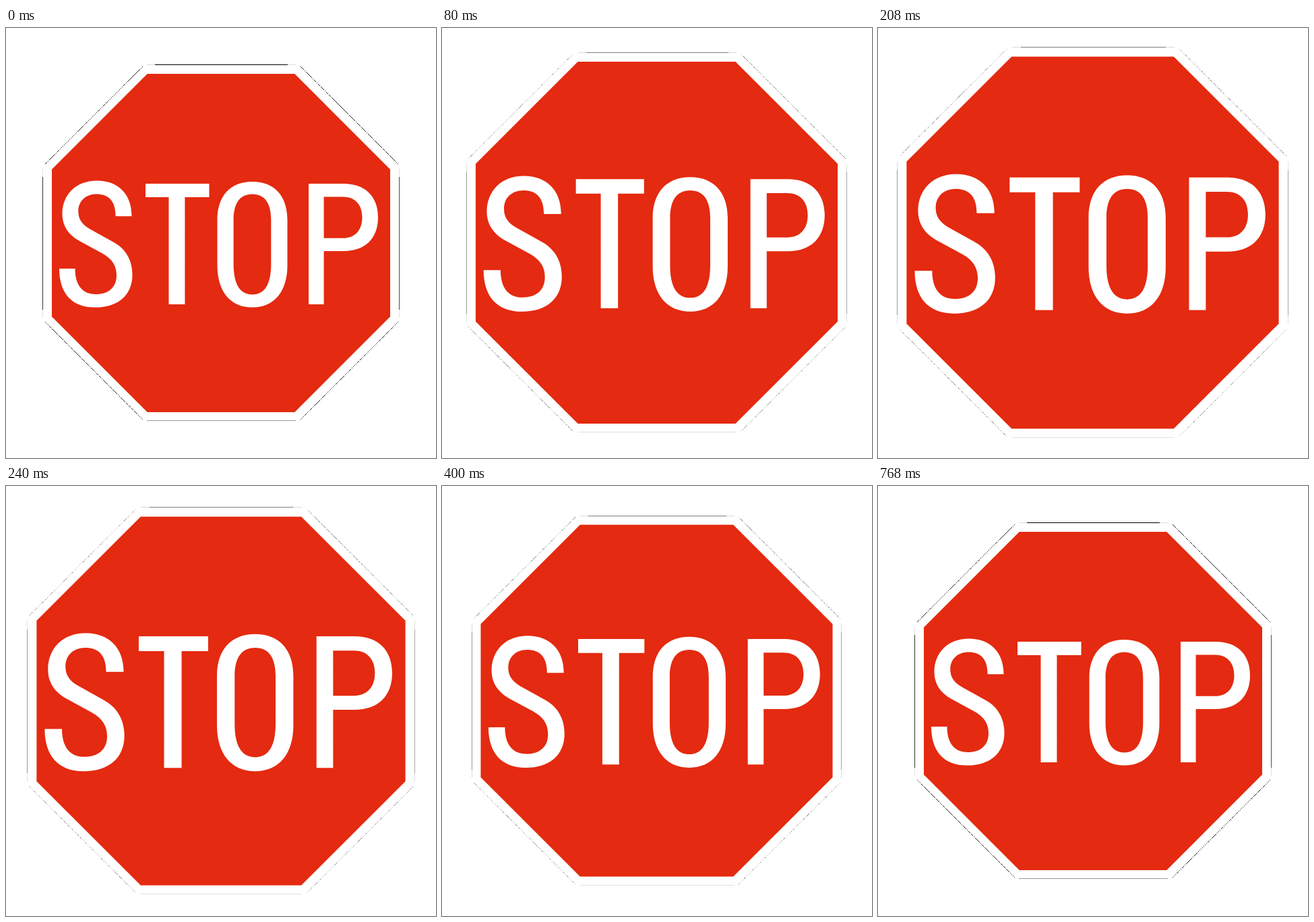
An HTML page with a canvas that plays this animation: 638x638 px, repeating every 960 ms.

```html
<!DOCTYPE html>
<html lang="en">
<head>
<meta charset="utf-8">
<title>Stop sign</title>
<style>
html, body { margin: 0; width: 100%; height: 100%; overflow: hidden; background: #fff; }
canvas { display: block; width: 638px; height: 638px; }
</style>
</head>
<body>
<canvas id="stage" width="638" height="638" role="img" aria-label="STOP"></canvas>
<script>
const ctx = document.getElementById('stage').getContext('2d');
const RED = '#e42a10';
const STEP = 80, LOOP = 960, MID = 319;

// Each pose: scale, centre
const poses = [[1, 319], [1.07, 318.5], [1.1, 318.5], [1.09, 319], [1.08, 318.5], [1.04, 318.5]];

// Sign lettering, drawn at scale 1
const letters = new Path2D(`
  M186.5 279.3C186.5 246 166 226.5 135 226.5C103 226.5 83.5 248 83.5 276
  C83.5 294 93 307 109 316L143 334.5C158 343 164 353 164 367
  C164 385 152 395 133 395C113 395 102.5 381 102.5 357H79
  C79 394 98 414.6 132 414.6C167 414.6 187.5 396 187.5 366
  C187.5 345 178 328 160 318L124 298C112 291 107.3 283 107.3 272
  C107.3 257 118 246.5 134 246.5C152 246.5 162.6 256 162.6 279.3Z
  M207 231H301.5V251H265.4V410H241.5V251H207Z
  M313.5 285C313.5 249 333 228 365.5 228C398 228 417.5 249 417.5 285V352
  C417.5 391 398 414.6 365.5 414.6C333 414.6 313.5 391 313.5 352Z
  M337.6 285C337.6 260 347 246.5 365.5 246.5C384 246.5 393.3 260 393.3 285V350
  C393.3 380 384 395.5 365.5 395.5C347 395.5 337.6 380 337.6 350Z
  M449 231H501C533 231 552 250 552 281C552 312 533 331 501 331H471.6V410H449Z
  M471.6 250.4H500C518 250.4 528.5 262 528.5 281C528.5 300 518 311.8 500 311.8H471.6Z`);

function octagon(half, corner) {
  ctx.beginPath();
  for (let i = 0; i < 4; i++) {
    const c = [1, 0, -1, 0][i], s = [0, 1, 0, -1][i];
    for (const v of [-corner, corner]) ctx.lineTo(half * c - v * s, half * s + v * c);
  }
  ctx.closePath();
}

function noise(n) {
  const v = Math.sin(n * 12.9898) * 43758.5453;
  return v - Math.floor(v);
}

function dot(x, y, alpha) {
  ctx.fillStyle = `rgba(0,0,0,${alpha})`;
  ctx.fillRect(Math.round(x), Math.floor(y), 1, 1);
}

// Thin ragged line around the white plate, which grows a little less than the face
function edge(scale, c, rest) {
  const s = 1 + (scale - 1) * 0.95;
  const reach = Math.round(98 * s), full = Math.round(110 * s);
  const near = Math.floor(c - 264.4 * s), far = Math.floor(c + 264.4 * s);
  const bottom = Math.floor(c + 263.9 * s);
  const dark = rest ? 1 : 0.5;
  for (let k = -full; k <= full; k++) {
    const inner = Math.abs(k) <= reach;
    dot(c + k, near, inner ? dark : 0.15);
    dot(near, c + k, inner ? dark * 0.8 : 0.12);
    dot(far, c + k, inner ? dark * 0.7 : 0.12);
    dot(c + k, bottom, rest ? 0.4 : 0.12);
  }
  const d = 189.5 * s, span = Math.round(72 * s);
  // sign x, sign y, chance of an extra dot
  const sides = [[-1, -1, 0.4], [1, -1, 0.6], [-1, 1, 0.5], [1, 1, 0.3]];
  sides.forEach(([sx, sy, extra], n) => {
    for (let t = -span; t <= span; t++) {
      const i = t + span;
      const filled = noise(i + n * 211 + s * 997) < (rest ? extra : extra * 0.6);
      if (i % 2 && !filled) continue;
      dot(c + sx * (d + t), c + sy * (d - t), rest ? 0.85 : filled ? 0.55 : 0.25);
    }
  });
}

function draw(time) {
  const i = Math.floor((time % LOOP) / STEP);
  const [s, c] = poses[i < poses.length ? i : 0];
  ctx.setTransform(1, 0, 0, 1, 0, 0);
  ctx.fillStyle = '#fff';
  ctx.fillRect(0, 0, 638, 638);
  edge(s, c, s === 1);
  ctx.setTransform(s, 0, 0, s, c, c);
  ctx.fillStyle = RED;
  octagon(251, 109.3);
  ctx.fill();
  ctx.translate(-MID, -MID);
  ctx.fillStyle = '#fff';
  ctx.fill(letters, 'evenodd');
}

let start;
function tick(now) {
  if (start === undefined) start = now;
  draw(now - start);
  requestAnimationFrame(tick);
}
draw(0);
requestAnimationFrame(tick);
</script>
</body>
</html>
```
